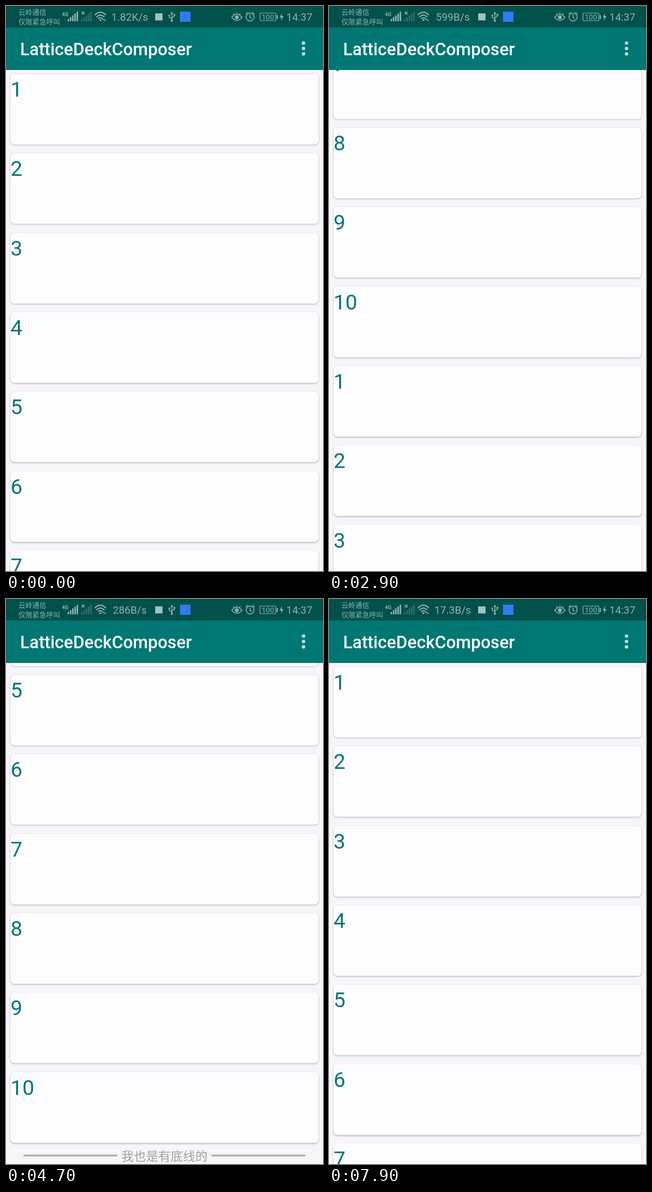
An HTML page with a canvas that plays this animation: 561x998 px, repeating every 8 s.

```html
<!DOCTYPE html>
<html lang="zh">
<head>
<meta charset="utf-8">
<title>Scrolling list</title>
<style>
html, body { margin: 0; width: 100%; height: 100%; overflow: hidden; background: #f7f5f7; }
canvas { display: block; }
</style>
</head>
<body>
<canvas id="stage" width="561" height="998"></canvas>
<script>
const ctx = document.getElementById('stage').getContext('2d');
const LOOP = 8000, STEP = 100, PITCH = 140.36, ITEMS = 20;
const TEAL = '#007772', DIM = '#8fb3b0', FAINT = '#2f6f6a';
const SANS = 'Roboto, sans-serif', CJK = '"Noto Sans CJK SC", "Noto Sans CJK", sans-serif';

// [time, scroll offset]
const scrollKeys = [[100, 0], [2300, 608.3], [3300, 1073.7], [3800, 1600], [4000, 1803], [4300, 1951],
  [6200, 1951], [6500, 1450], [6800, 700], [7100, 185.5], [7400, 0], [LOOP, 0]];

function scrollAt(t) {
  const i = scrollKeys.findIndex(k => t < k[0]);
  if (i < 1) return 0;
  const [t0, s0] = scrollKeys[i - 1], [t1, s1] = scrollKeys[i];
  return s0 + (s1 - s0) * (t - t0) / (t1 - t0);
}

function rect(x, y, w, h, color) {
  ctx.fillStyle = color;
  ctx.fillRect(x, y, w, h);
}

function text(str, x, y, font, color, align = 'left') {
  ctx.font = font;
  ctx.fillStyle = color;
  ctx.textAlign = align;
  ctx.fillText(str, x, y);
}

function dot(x, y, r, color) {
  ctx.fillStyle = color;
  ctx.beginPath();
  ctx.arc(x, y, r, 0, 7);
  ctx.fill();
}

function line(path, width = 1.5, color = DIM) {
  ctx.strokeStyle = color;
  ctx.lineWidth = width;
  ctx.stroke(new Path2D(path));
}

function fill(path, color = DIM) {
  ctx.fillStyle = color;
  ctx.fill(new Path2D(path));
}

function card(y, label) {
  ctx.save();
  ctx.shadowColor = 'rgba(40,35,60,.32)';
  ctx.shadowBlur = 3;
  ctx.shadowOffsetY = 0.6 + Math.max(0, y) / 900;
  ctx.fillStyle = '#fdfcff';
  ctx.beginPath();
  ctx.roundRect(8, y, 545, 124.7, 7);
  ctx.fill();
  ctx.restore();
  text(label, 8, y + 40, '37.4px ' + SANS, TEAL);
}

function list(scroll) {
  const top = i => Math.round(120 + i * PITCH - scroll);
  rect(0, 112, 561, 886, '#f7f5f7');
  for (let i = 0; i < ITEMS; i++) {
    const y = top(i);
    if (y > -30 && y < 1000) card(y, i % 10 + 1);
  }
  const end = top(ITEMS);
  rect(31, end + 5.5, 166, 3, '#a9a6ac');
  rect(364, end + 5.5, 166, 3, '#a9a6ac');
  text('我也是有底线的', 280.5, end + 16, '21.8px ' + CJK, '#a3a0a6', 'center');
}

function touch(t, scroll) {
  let x, y;
  if (t >= 3800 && t < 4300) {
    x = 510;
    y = 416 + 1803 - scroll;
  } else if (t >= 6200 && t < 6600) {
    x = 407;
    y = 228 + 1951 - scroll;
  } else return;
  dot(x, y, 17, 'rgba(255,255,255,.45)');
  ctx.strokeStyle = '#cdc9e6';
  ctx.lineWidth = 2;
  ctx.beginPath();
  ctx.arc(x, y, 17.3, 0, 7);
  ctx.stroke();
}

function bars(x, color) {
  for (let i = 0; i < 5; i++) rect(x + i * 4, 23 - i * 3.2, 2.6, 4 + i * 3.2, color);
}

function statusBar(t) {
  rect(0, 0, 561, 38, '#00504b');
  text('云岭通信', 22, 15.5, '12.3px ' + CJK, DIM);
  text('仅限紧急呼叫', 22, 32.5, '12.3px ' + CJK, DIM);
  text('4G', 99, 18, 'bold 9px ' + SANS, DIM);
  bars(109, DIM);
  bars(133, FAINT);
  line('M134 10l5 5M139 10l-5 5');

  // Wi-Fi
  line('M157 16Q167 6 177 16M160 19.5Q167 12.5 174 19.5M163 22.5Q167 19 171 22.5', 2);
  dot(167, 25, 1.8, DIM);
  fill('M170 25l2-3 2 3zM173 24l2 3 2-3z');

  const speed = t < 1300 ? '1.82K/s' : t < 4300 ? '599B/s' : t < 7300 ? '286B/s' : '17.3B/s';
  text(speed, 219, 26, '18.5px ' + SANS, DIM, 'center');
  rect(264, 13, 13, 12.5, '#a3c1be');

  // USB
  line('M293.5 13V26M293.5 23L289 20V16M293.5 21L298 18V15');
  fill('M291 14l2.5-4 2.5 4z');
  dot(293.5, 26, 2, DIM);
  dot(289, 16.5, 1.5, DIM);
  rect(296.5, 14, 3, 3, DIM);

  rect(308, 10, 18.5, 18, '#2f7df5');

  // Eye
  line('M399.5 20Q408.5 9 417.5 20Q408.5 31 399.5 20ZM402 13l2 2M408.5 11v2M415 13l-2 2');
  dot(408.5, 20, 3.4, DIM);

  // Alarm clock
  line('M425 19.5a7 7 0 1 0 14 0a7 7 0 1 0 -14 0M432 15v5l3 2M424 14.5l4-3.5M440 14.5l-4-3.5');

  // Battery
  line('M451 12.5h25a1.5 1.5 0 0 1 1.5 1.5v10.5a1.5 1.5 0 0 1 -1.5 1.5h-25a1.5 1.5 0 0 1 -1.5 -1.5v-10.5a1.5 1.5 0 0 1 1.5 -1.5z', 1.2);
  rect(479, 16, 2, 7, DIM);
  text('100', 463.5, 24, '13px ' + SANS, DIM, 'center');
  fill('M488.5 12l-4 8h3l-1 6 4.5-8h-3z');

  text('14:37', 496, 26, '18.5px ' + SANS, DIM);
}

function toolbar() {
  rect(0, 38, 561, 75, TEAL);
  text('LatticeDeckComposer', 25, 87, '500 30.6px ' + SANS, '#fbffff');
  for (const y of [65.5, 75, 84.5]) dot(526.5, y, 3.1, '#c5dfdd');
}

function draw(now) {
  const t = Math.floor(now % LOOP / STEP) * STEP;
  const scroll = scrollAt(t);
  list(scroll);
  toolbar();
  statusBar(t);
  touch(t, scroll);
}

const start = performance.now();
function tick() {
  draw(performance.now() - start);
  requestAnimationFrame(tick);
}
tick();
</script>
</body>
</html>
```
